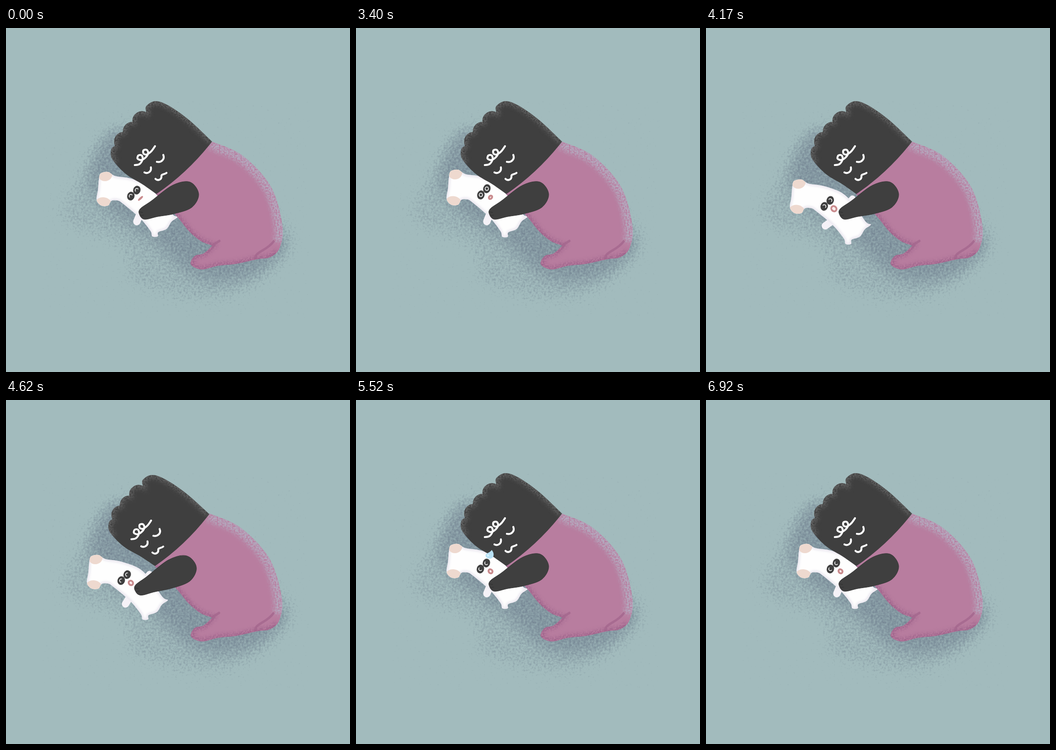
Write an HTML page that moves like this. It is 748 by 748 pixels and loops after 8 s.

```html
<!DOCTYPE html>
<html lang="en">
<head>
<meta charset="utf-8">
<title>Tight hug</title>
<style>
  html, body { margin: 0; width: 100%; height: 100%; overflow: hidden; background: #a2bbbd; }
  svg { position: absolute; inset: 0; width: 100%; height: 100%; }
  .line { fill: none; stroke-linecap: round; stroke-linejoin: round; }
  .edge { fill: none; }
  .dark { fill: #3f3f3f; }
</style>
</head>
<body>
<!-- Ground shadow, kept apart so its filter is painted once -->
<svg viewBox="0 0 748 748">
  <filter id="smoke" filterUnits="userSpaceOnUse" x="80" y="160" width="580" height="470" color-interpolation-filters="sRGB">
    <feGaussianBlur in="SourceAlpha" stdDeviation="17" result="shape"/>
    <feTurbulence type="fractalNoise" baseFrequency=".22" numOctaves="4" seed="4"/>
    <feComposite in2="shape" operator="arithmetic" k2="1" k3="1" k4="-.72" result="mask"/>
    <feFlood flood-color="#70808f"/>
    <feComposite in2="mask" operator="in"/>
  </filter>
  <g filter="url(#smoke)">
    <path id="shadowFar" opacity=".36"/>
    <path id="shadowNear" opacity=".72"/>
  </g>
</svg>

<svg viewBox="0 0 748 748">
  <defs>
    <filter id="grain" filterUnits="userSpaceOnUse" x="170" y="130" width="460" height="420" color-interpolation-filters="sRGB">
      <feGaussianBlur in="SourceGraphic" stdDeviation="5" result="soft"/>
      <feTurbulence type="fractalNoise" baseFrequency=".3" numOctaves="3" seed="9"/>
      <feComponentTransfer result="specks"><feFuncA type="linear" slope="3" intercept="-.85"/></feComponentTransfer>
      <feComposite in="soft" in2="specks" operator="in"/>
    </filter>
    <filter id="soft"><feGaussianBlur stdDeviation="2.5"/></filter>
    <path id="bodyShape" pathLength="100"/>
    <path id="headShape" pathLength="100"/>
    <path id="armShape"/>
    <path id="dogShape"/>
    <clipPath id="bodyClip"><use href="#bodyShape"/></clipPath>
    <clipPath id="headClip"><use href="#headShape"/></clipPath>
    <clipPath id="dogClip"><use href="#dogShape"/></clipPath>
  </defs>

  <g id="dog">
    <path id="paw" class="line" stroke="#f5f2f7" stroke-width="16" d="M293 400 L284.500 421"/>
    <path id="farPaw" class="line" stroke="#f5f2f7" stroke-width="13" d="M322 367 L333 354"/>
    <use href="#dogShape" fill="#fefefe"/>
    <g clip-path="url(#dogClip)">
      <use href="#dogShape" class="edge" filter="url(#soft)" stroke="#e3deea" stroke-width="7" opacity=".7"/>
      <ellipse cx="216" cy="320" rx="15" ry="13" fill="#eed9cf" transform="rotate(-12 216 320)"/>
      <ellipse cx="212" cy="381" rx="17" ry="13" fill="#eed9cf" transform="rotate(8 212 381)"/>
    </g>
    <g id="dogFace">
      <g id="eyes"></g>
      <ellipse id="dogMouth" fill="#fbeeee" stroke="#c98b8d" stroke-width="4" transform="translate(292.500 370.500) rotate(-42)"/>
    </g>
  </g>

  <g id="body">
    <use href="#bodyShape" fill="#b87d9f"/>
    <g clip-path="url(#bodyClip)">
      <use href="#bodyShape" class="edge" filter="url(#grain)" stroke="#b4a9be" stroke-width="36" stroke-dasharray="32 100"/>
      <use href="#bodyShape" class="edge" filter="url(#grain)" stroke="#9a6088" stroke-width="13" stroke-dasharray="0 34 48 100"/>
      <path class="line" stroke="#a4678e" stroke-width="5" opacity=".8" d="M541 500 C546 484 566 485 582 464 M446 474 L464 463"/>
    </g>
  </g>

  <g id="head">
    <use href="#headShape" class="dark"/>
    <g clip-path="url(#headClip)">
      <use href="#headShape" class="edge" filter="url(#grain)" stroke="#666" stroke-width="15" stroke-dasharray="56 100"/>
    </g>
    <g id="face" class="line" stroke="#fff" stroke-width="4.200">
      <path id="brow"/>
      <path d="M301 314 C308 318 317 312 315 303 M328 291 C337 293 346 286 342 276"/>
      <path d="M325 328 C330 333 338 330 338 323 C337 317 345 319 349 315"/>
    </g>
  </g>

  <g id="arm">
    <use href="#armShape" class="dark" stroke="#383838"/>
    <path class="line" stroke="#333" stroke-width="1.500" d="M291 400 L297 401 M293 408 L299 407"/>
  </g>

  <g id="drop">
    <path fill="#b9e2f6" d="M295 326 C301 332 301 343 293 345 C284 346 279 339 283 335 C287 332 292 331 295 326Z"/>
    <circle cx="287" cy="338" r="2" fill="#dcf2fc"/>
  </g>
</svg>

<script>
const LOOP = 8000;
const $ = id => document.getElementById(id);
const set = (el, attrs) => { for (const k in attrs) el.setAttribute(k, attrs[k]); };

// Smooth curve through a few "x y" points (Catmull-Rom as cubic Béziers)
function spline(text, closed = false) {
  const p = text.split(',').map(s => s.trim().split(' ').map(Number)), n = p.length;
  const at = i => closed ? p[(i + n) % n] : p[Math.max(0, Math.min(n - 1, i))];
  let d = '';
  for (let i = 0; i < (closed ? n : n - 1); i++) {
    const [a, b, c, e] = [at(i - 1), at(i), at(i + 1), at(i + 2)];
    const out = b.map((v, k) => v + (c[k] - a[k]) / 6);
    const into = c.map((v, k) => v - (e[k] - b[k]) / 6);
    d += `C${out} ${into} ${c}`;
  }
  return d;
}
const start = text => `M${text.split(',')[0]}`;
const blob = text => start(text) + spline(text, true) + 'Z';
const open = text => start(text) + spline(text);

const shapes = {
  shadowFar: blob('250 200, 165 300, 118 420, 250 480, 270 555, 440 598, 570 545, 622 435, 400 300'),
  shadowNear: blob('245 225, 185 300, 200 375, 320 465, 400 535, 480 552, 565 520, 600 450, 400 330'),
  bodyShape: open('448 247, 515 278, 576 345, 601 430, 595 478, 575 498, 545 503, 500 513, 461 517, 425 525, 402 514, 410 496, 430 490, 449 473')
    + spline('449 473, 425 464, 399 443, 371 409, 326 361') + 'Z',
  headShape: open('448 247, 398 200, 354 169, 325 159, 305 170, 305 183')
    + ['275 204', '254 226', '237 256'].map(notch => `A21 21 0 0 0 ${notch}`).join('')
    + spline('237 256, 229 264, 231 285, 260 317, 297 340, 327 361') + 'Q396 314 448 247Z',
  armShape: blob('292 393, 316 376, 362 342, 400 335, 419 361, 404 390, 365 404, 330 410, 301 416, 290 405'),
  dogShape: blob('202 329, 206 316, 222 313, 238 322, 270 327, 310 342, 336 368, 362 405, 373 411, 360 421, 349 437, 331 444, 330 453, 318 453, 314 441, 290 412, 253 381, 242 375, 229 376, 222 386, 207 386, 197 374, 200 352'),
  brow: open('280 298, 290 296, 297 286, 295 277, 288 277, 286 284, 294 287, 304 281, 309 272, 306 265, 299 266, 299 273, 306 275, 316 268, 324 257'),
};
for (const id in shapes) set($(id), { d: shapes[id] });

const eyes = [[271.5, 365.5], [284.5, 352.5]].map(([x, y]) => {
  $('eyes').insertAdjacentHTML('beforeend', `<g transform="translate(${x} ${y})">
    <ellipse class="dark" rx="8" ry="9.500" transform="rotate(18)"/>
    <circle class="line" r="3.600" stroke="#fff" stroke-width="1.600" pathLength="360"/></g>`);
  return $('eyes').lastChild;
});

const ramp = (t, from, to) => Math.max(0, Math.min(1, (t - from) / (to - from)));

// Hold each drawing: stills, then 70 ms steps, then 100 ms steps.
function hold(t) {
  const step = (from, length) => from + Math.floor((t - from) / length) * length;
  if (t < 400) return step(0, 100);
  if (t < 3400) return 400;
  if (t < 4520) return step(3400, 70);
  return Math.min(step(4520, 100), 6920);
}

// Shear and squash around a pivot
const warp = (px, py, b, c, d) => `translate(${px} ${py}) matrix(1 ${b} ${c} ${d} 0 0) translate(${-px} ${-py})`;

function draw(t) {
  const startled = t >= 3400;
  const out = ramp(t, 3400, 4520) * (1 - ramp(t, 4620, 5420));
  const reach = ramp(t, 4170, 4620) * (1 - ramp(t, 4620, 5520));
  const kick = Math.sin(Math.PI * ramp(t, 3400, 4750));
  const stretch = startled ? .04 * (1 - ramp(t, 3400, 4170)) : 0;

  set($('dog'), { transform: `translate(${-21 * out} ${24 * out}) ${warp(290, 430, 0, 0, 1 + stretch)}` });
  set($('paw'), { transform: `rotate(${33 * kick} 292 399)` });
  set($('farPaw'), { opacity: out > .35 ? 1 : 0 });

  const tremble = t >= 6020 && t < 6920 ? Math.cos(Math.PI * t / 100) * .6 : 0;
  set($('dogFace'), { transform: `translate(0 ${4 * kick + 2 * ramp(t, 3400, 3800)})` });
  set($('eyes'), { transform: `translate(${tremble - ramp(t, 5020, 5420)} 0)` });
  const angle = t < 200 ? 230 : 135 + 180 * kick;
  const span = t >= 3400 && t < 3600 ? 360 : 180;
  for (const eye of eyes) {
    set(eye.lastChild, { 'stroke-dasharray': `${span} ${360.01 - span}`, transform: `rotate(${angle - span / 2})` });
  }
  set($('dogMouth'), {
    rx: startled ? 4 + 1.3 * kick : 5,
    ry: startled ? 3 + 1.7 * ramp(t, 3400, 3700) + 1.4 * kick : .3,
  });

  set($('body'), { transform: warp(500, 500, 0, .02 * reach, 1) });
  set($('head'), { transform: `translate(${-3 * reach} 0) ${warp(326, 360, -.01 * reach, .025 * reach, 1 - .02 * reach)}` });
  set($('face'), { transform: `translate(${-3 * reach} ${3 * reach})` });
  set($('arm'), { transform: `translate(${-6 * reach} ${4 * reach}) rotate(${-2.5 * reach} 400 360) translate(400 360) scale(${1 + .05 * reach} 1) translate(-400 -360)` });

  const size = 1 - .5 * ramp(t, 5620, 5920);
  set($('drop'), { opacity: t >= 5420 && t < 6020 ? 1 : 0, transform: `translate(288 341) scale(${size}) translate(-288 -341)` });
}

let shown = -1;
function tick() {
  const t = hold(performance.now() % LOOP);
  if (t !== shown) draw(shown = t);
  requestAnimationFrame(tick);
}
tick();
</script>
</body>
</html>
```
